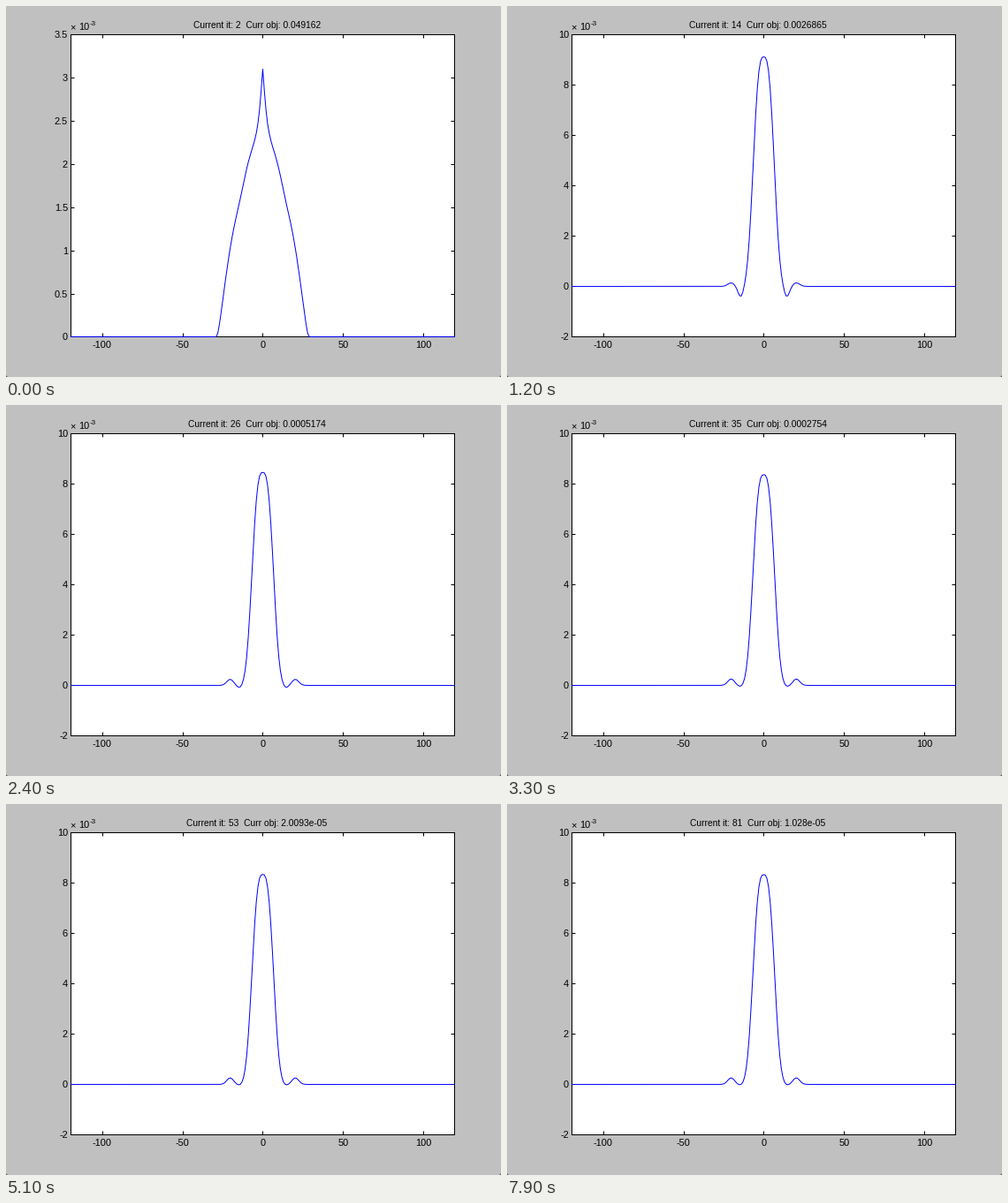
Recreate the animation shown at these times as a matplotlib script. Size 560 px wide and 420 px high, loop 8 s.

```python
import matplotlib.pyplot as plt
import numpy as np
from matplotlib.animation import FuncAnimation
from matplotlib.patches import Polygon

W, H, DPI = 560, 420, 80
PX = 72 / DPI  # one pixel in points
FRAMES, INTERVAL = 80, 100
FIRST_IT, TURN_IT = 2, 14  # start of the run, end of the overshoot phase

plt.rcParams["font.family"] = "Liberation Sans"
plt.rcParams["axes.unicode_minus"] = False

# Key values of the objective; log-linear in between
OBJ_IT = [2, 14, 26, 35, 53, 67, 81]
OBJ = [0.049162, 0.0026865, 0.0005174, 0.0002754,
       2.0093e-05, 1.1127e-05, 1.028e-05]

x = np.concatenate(([-119.5], np.arange(-119, 120), [119.5]))
r = np.abs(x)


def bell(center, width):
    return np.exp(-((r - center) / width) ** 2)


def start_curve():
    """Cosine tent with a sharp cusp, ending at |x| = 29."""
    s = np.minimum(r, 29)
    tent = 2.3 * np.cos(np.pi * s / 58) - .07 * bell(14, 4)
    cusp = .8 * np.exp(-(r / 2.3) ** 1.2)
    return (tent + cusp) * (1 - (s / 29) ** 12)


def lobe_curve(a):
    """Main lobe with side dips and bumps; a = 1 overshoots, a = 0 is settled."""
    lobe = (8.33 + .79 * a) * np.exp(-(r / (7.9 - .2 * a)) ** 2.9)
    dip = (.04 + .38 * a) * bell(14.3, 2.4)
    bump = (.26 - .12 * a) * bell(20.3, 3)
    return lobe - dip + bump


def profile(it):
    if it < TURN_IT:
        rise = 1 - np.exp((FIRST_IT - it) / 2)
        return (1 - rise) * start_curve() + rise * lobe_curve(1)
    return lobe_curve(1 / (1 + ((it - TURN_IT) / 6) ** 2.3))


def objective(it):
    return float(np.exp(np.interp(it, OBJ_IT, np.log(OBJ))))


def nice_ticks(lo, hi):
    for step in (.5, 1, 2):
        first, last = np.floor(lo / step), np.ceil(hi / step)
        if last - first <= 9:
            break
    return np.arange(first, last + 1) * step


def label(px, py, text, size, **kw):
    return fig.text(px / W, 1 - py / H, text, fontsize=size * PX,
                    va="baseline", **kw)


fig = plt.figure(figsize=(W / DPI, H / DPI), dpi=DPI, facecolor="#c0c0c0")
# Just short of half pixels, so that edges snap to the right pixel
ax = fig.add_axes([73.45 / W, 45.55 / H, 434 / W, 342 / H], facecolor="white")
ax.set_xlim(-119.5, 119.5)
ax.set_xticks(range(-100, 101, 50))
for spine in ax.spines.values():
    spine.set_linewidth(PX)
ax.tick_params(direction="in", top=True, right=True, length=4 * PX,
               width=PX, labelsize=11 * PX)
ax.tick_params(axis="x", pad=5 * PX)
ax.tick_params(axis="y", pad=3.5 * PX)

line, = ax.plot([], [], color="#0000ff", lw=PX, clip_on=False, zorder=3)
title = label(284, 25, "", 10.2, ha="center")
label(72, 27, "×", 11)
label(82, 27, "10", 11)
label(95, 21.5, "-3", 8)

# Rounded window corners
for cx, dx in ((0, 2), (W, -2)):
    pts = [(cx / W, 0), ((cx + dx) / W, 0), (cx / W, 2 / H)]
    fig.add_artist(Polygon(pts, color="#606060", lw=0,
                           transform=fig.transFigure))


def update(i):
    it = FIRST_IT + i
    y = profile(it)
    ticks = nice_ticks(y.min(), y.max())
    ax.set_ylim(ticks[0], ticks[-1])
    ax.set_yticks(ticks, [f"{v:g}" for v in ticks])
    line.set_data(x, y)
    title.set_text(f"Current it: {it}  Curr obj: {objective(it):.5g}")
    return line, title


anim = FuncAnimation(fig, update, frames=FRAMES, interval=INTERVAL,
                     repeat=True, repeat_delay=0, blit=False)
plt.show()
```
